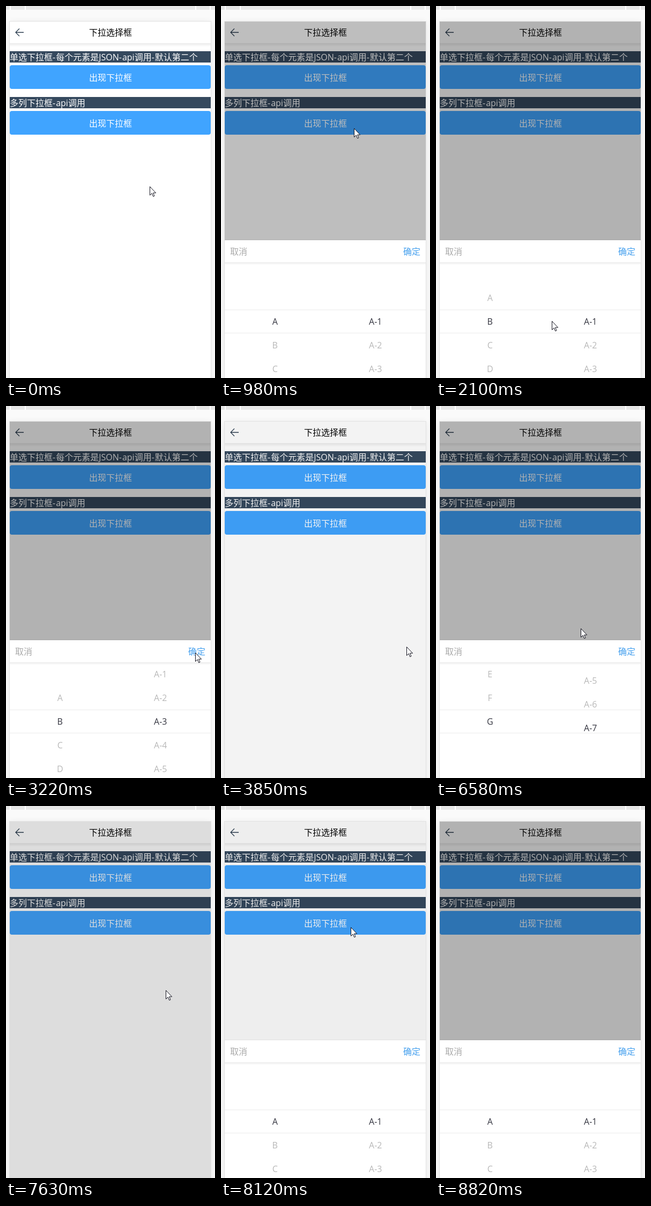
An HTML page that plays this animation: 390 by 691 pixels, repeating every 9450 ms.

```html
<!DOCTYPE html>
<html lang="zh">
<head>
<meta charset="utf-8">
<style>
html, body { margin: 0; width: 100%; height: 100%; overflow: hidden; background: #fafafa; }
svg { display: block; }
text { font: 16px "Open Sans", "Noto Sans CJK SC", "Noto Sans CJK", sans-serif; }
.mid { text-anchor: middle; }
</style>
</head>
<body>
<svg width="390" height="691" viewBox="0 0 390 691">
  <defs>
    <filter id="glow" x="-10%" y="-10%" width="120%" height="120%"><feGaussianBlur stdDeviation="7"/></filter>
    <linearGradient id="fall" x2="0" y2="1">
      <stop stop-color="#000" stop-opacity=".08"/>
      <stop offset="1" stop-color="#000" stop-opacity="0"/>
    </linearGradient>
    <clipPath id="wheel"><rect x="7" y="477" width="375" height="214"/></clipPath>
  </defs>

  <rect width="390" height="691" fill="#fafafa"/>
  <rect x="7" y="31" width="375" height="700" opacity=".09" filter="url(#glow)"/>
  <rect width="390" height="7" fill="#e6e6e6"/>
  <path d="M8 0v7M36 0v7M354 0v7M381 0v7" stroke="#fff" stroke-width="2"/>
  <rect x="6.5" y="28.5" width="376" height="680" fill="#fff" stroke="#e2e2e2"/>

  <rect x="7" y="69" width="375" height="7" fill="url(#fall)"/>
  <path d="M33 49H18.5M25 42l-7 7 7 7" fill="none" stroke="#2c3e50" stroke-width="1.3"/>
  <text class="mid" x="195" y="55">下拉选择框</text>

  <g fill="#35495e">
    <rect x="7" y="84" width="375" height="21"/>
    <rect x="7" y="169" width="375" height="21"/>
  </g>
  <g fill="#40a4ff">
    <rect x="7" y="110" width="375" height="44" rx="4"/>
    <rect x="7" y="195" width="375" height="44" rx="4"/>
  </g>
  <g fill="#fff">
    <text x="7" y="101">单选下拉框-<tspan dx="1">每个元素是JSON-</tspan><tspan dx="1">api调用-</tspan><tspan dx="1">默认第二个</tspan></text>
    <text x="7" y="186">多列下拉框-<tspan dx="1">api调用</tspan></text>
    <text class="mid" x="195" y="139">出现下拉框</text>
    <text class="mid" x="195" y="224">出现下拉框</text>
  </g>

  <rect id="mask" x="7" y="29" width="375" height="662"/>

  <g id="sheet">
    <rect x="7" y="435" width="375" height="256" fill="#fff"/>
    <path d="M7 434.5H382" stroke="#000" stroke-opacity=".06"/>
    <path d="M7 564.5H382M7 607.5H382" stroke="#ebebeb"/>
    <g id="items" clip-path="url(#wheel)"></g>
    <rect x="7" y="476" width="375" height="5" fill="url(#fall)"/>
    <text x="17" y="462" fill="#aaa">取消</text>
    <text x="340" y="462" fill="#45a0ee">确定</text>
  </g>

  <path id="cursor" d="M.5.5V16.5L4.2 13 6.7 18.8 9 17.8 6.6 12.2H11.6Z" fill="#fff" stroke="#10101c"/>
</svg>
<script>
const LOOP = 9450, TICK = 70, ROW = 44, COUNT = 7, FADE = 300, SNAP = 210;
const $ = id => document.getElementById(id);
const progress = (t, from, to) => Math.min(1, Math.max(0, (t - from) / (to - from)));
const mix = (a, b, p) => a + (b - a) * p;
const easeOut = p => 1 - (1 - p) ** 2.2;

const popups = [
  { open: 808, close: 3678 },
  { open: 4398, close: 7538 },
  { open: 8088, close: LOOP }
];

// The pointer's path is a chain of straight gestures; a drag also pulls a column along.
const gestures = [];
let hand = { x: 268, y: 335 };

function move(start, end, x, y, column) {
  gestures.push({ start, end, column, from: hand, to: { x, y } });
  hand = { x, y };
}
const drag = (start, end, column, rise) => move(start, end, hand.x, hand.y - rise, column);

move(280, 490, 248, 227);
move(1190, 1610, 116, 598);
drag(1680, 1820, 0, 65);
move(1890, 2240, 283, 620);
drag(2310, 2520, 1, 92);
move(2660, 3220, 353, 458);
move(3830, 4270, 207, 215);
move(4900, 5320, 92, 668);
drag(5390, 5810, 0, 262);
move(5880, 6160, 242, 605);
move(6300, 6440, 270, 665);
drag(6440, 6580, 1, 252);
move(6650, 7070, 341, 463);
move(7280, 7420, 353, 458);
move(7490, 7770, 242, 225);
move(8540, 8750, 264, 594);
const pointerGone = 8820;

function pointerAt(t) {
  const g = gestures.filter(g => g.start <= t).pop() || gestures[0];
  const p = progress(t, g.start, g.end);
  return [mix(g.from.x, g.to.x, p), mix(g.from.y, g.to.y, p)].map(Math.round);
}

// A column follows its drag, then settles on the nearest row.
function scrollAt(t, column, popup) {
  const g = gestures.find(g => g.column === column && g.start > popup.open && g.end < popup.close);
  if (!g) return 0;
  const rise = g.from.y - g.to.y, release = g.end + TICK;
  const settled = Math.round(rise / ROW) * ROW;
  return rise * progress(t, g.start, g.end)
    + (settled - rise) * easeOut(progress(t, release, release + SNAP));
}

function makeColumn(x, label) {
  return Array.from({ length: COUNT }, (_, i) => {
    const node = document.createElementNS("http://www.w3.org/2000/svg", "text");
    node.setAttribute("class", "mid");
    node.setAttribute("x", x);
    node.textContent = label(i);
    $("items").append(node);
    return node;
  });
}

const columns = [
  makeColumn(100.75, i => String.fromCharCode(65 + i)),
  makeColumn(288.25, i => `A-${i + 1}`)
];

function drawColumn(nodes, offset) {
  const chosen = Math.round(offset / ROW);
  nodes.forEach((node, i) => {
    node.setAttribute("y", 592 + i * ROW - offset);
    node.setAttribute("fill", i === chosen ? "#33343f" : "#b8b8b8");
  });
}

const show = (id, on) => $(id).setAttribute("display", on ? "inline" : "none");

function draw(t) {
  const fade = start => easeOut(progress(t, start, start + FADE));
  const shade = popups.reduce((sum, p) => sum + fade(p.open) - fade(p.close), 0);
  $("mask").setAttribute("opacity", .3 * shade);

  const popup = popups.find(p => t >= p.open && t < p.close);
  show("sheet", popup);
  if (popup) columns.forEach((nodes, i) => drawColumn(nodes, scrollAt(t, i, popup)));

  $("cursor").setAttribute("transform", `translate(${pointerAt(t)})`);
  show("cursor", t < pointerGone);
}

const start = performance.now();
function frame() {
  const t = (performance.now() - start) % LOOP;
  draw(Math.floor(t / TICK) * TICK);
  requestAnimationFrame(frame);
}
frame();
</script>
</body>
</html>
```
